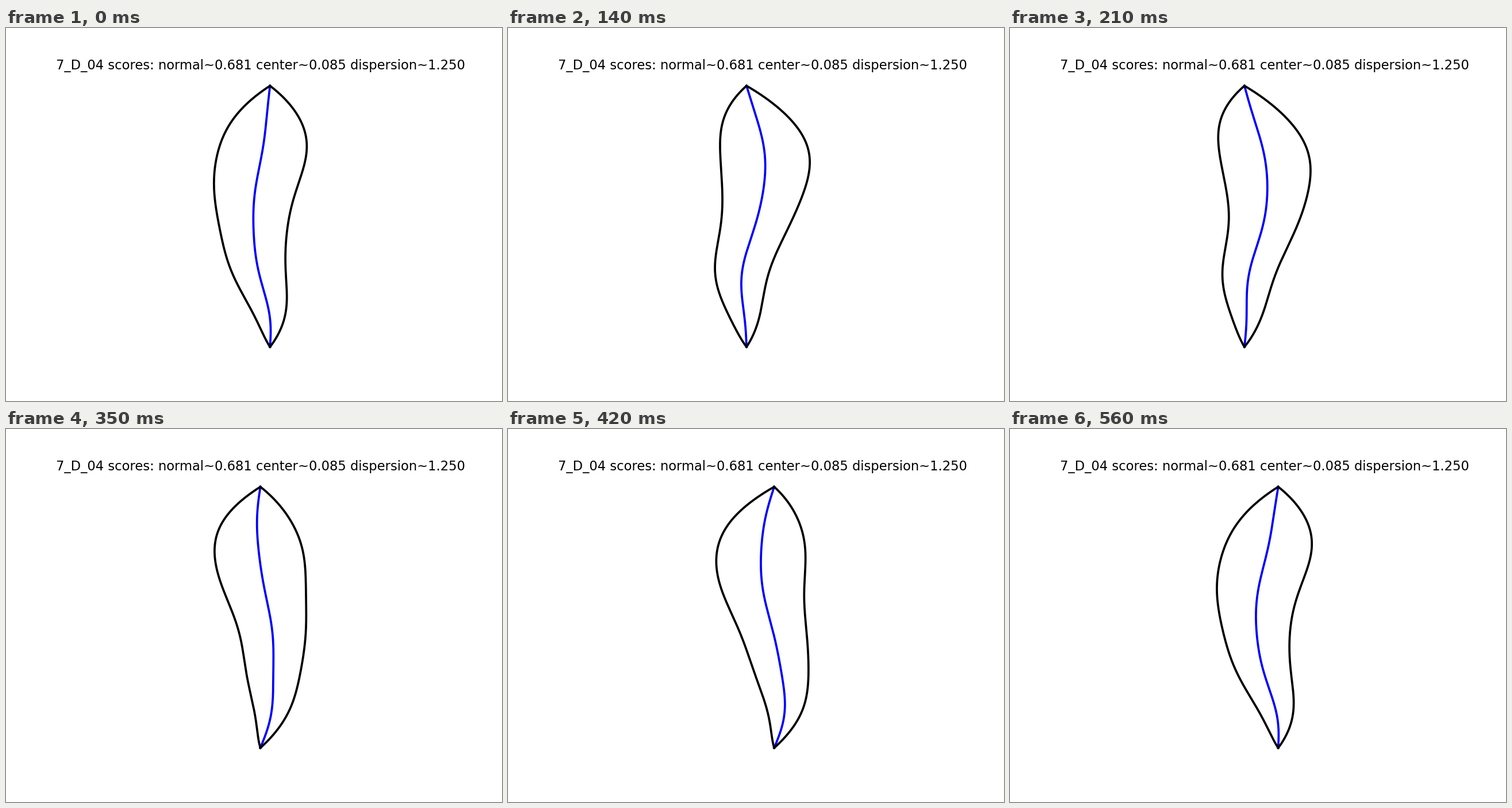
Write a matplotlib script that moves like this. It is 863 px wide and 649 px high and loops after 630 ms.

```python
import numpy as np
import matplotlib.pyplot as plt
from matplotlib.animation import FuncAnimation

W, H, DPI = 863, 649, 100
FRAMES, INTERVAL = 9, 70
TOP, BOTTOM, CENTER = 100.6, 554.9, 442.6
PT = 72 / DPI  # points per pixel

# Height axis: u runs from -1 (top tip) to 1 (bottom tip)
U = -np.cos(np.linspace(0, np.pi, 240))
S = (1 + U) / 2
Y = TOP + (BOTTOM - TOP) * S

# The body is round, so its half-width is one profile for every view
NODES = -np.cos(np.arange(9) * np.pi / 8)
WIDTHS = [0, 22.25, 62.9, 77.2, 62.6, 48.7, 31, 10.6, 0]
HALF = np.polyval(np.polyfit(NODES, WIDTHS, 8), U)

# Spine as sine modes along the height: a resting bend plus a turning part
REST = np.array([0, -0.5, 1.7, -1.8, 1, -1])
MODES = np.sin(np.pi * np.outer(np.arange(1, len(REST) + 1), S))


def spine(k):
    """Sideways offset of the midline from the tips in view k of a full turn."""
    angle = 2 * np.pi * k / FRAMES
    bow = 33.1 * np.cos(angle - np.radians(138))
    p = angle + np.radians(20)
    twist = 16.2 * np.sin(p) - 4.7 * np.sin(2 * p) - 2.3 * np.sin(3 * p)
    weights = REST.copy()
    weights[:3] += bow, twist, -0.15 * bow
    return weights @ MODES


fig = plt.figure(figsize=(W / DPI, H / DPI), dpi=DPI, facecolor="white")
ax = fig.add_axes([0, 0, 1, 1])
ax.set_xlim(0, W)
ax.set_ylim(H, 0)
ax.axis("off")

ax.text(443, 71.6, "7_D_04 scores: normal~0.681 center~0.085 dispersion~1.250",
        family="DejaVu Sans", size=22.6 * PT, ha="center", va="baseline")

mid, left, right = (ax.plot([], [], color=c, lw=3.75 * PT)[0]
                    for c in ("blue", "black", "black"))


def draw(k):
    m = spine(k)
    # keep the outline's bounding box centred
    x = m + CENTER - (np.min(m - HALF) + np.max(m + HALF)) / 2
    for line, side in ((left, -1), (mid, 0), (right, 1)):
        line.set_data(x + side * HALF, Y)
    return left, mid, right


anim = FuncAnimation(fig, draw, frames=FRAMES, interval=INTERVAL,
                     repeat=True, repeat_delay=0)
plt.show()
```
